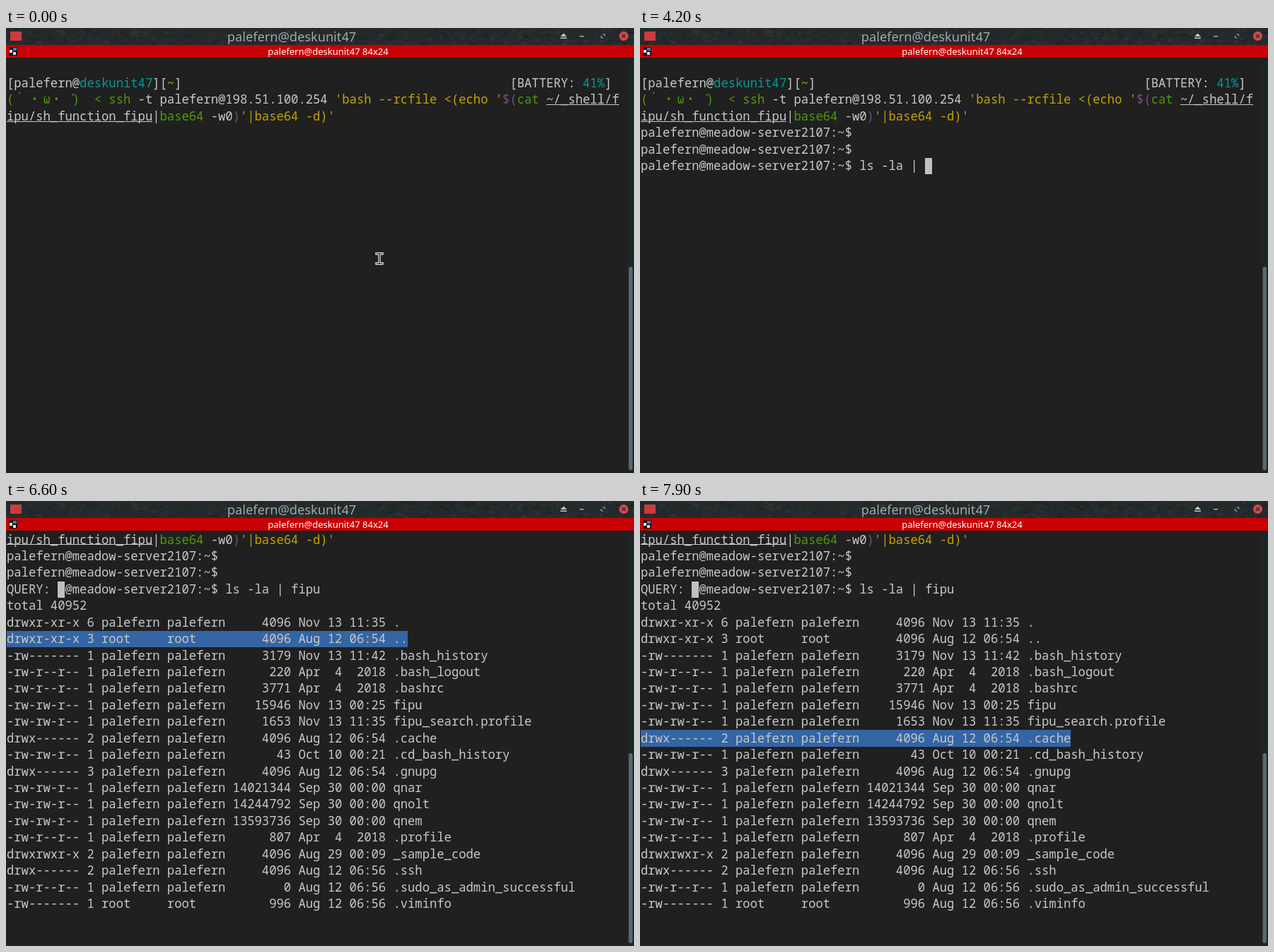
Write an HTML page with a canvas that moves like this. It is 888x630 px and loops after 8 s.

```html
<!DOCTYPE html>
<html lang="en">
<head>
<meta charset="utf-8">
<title>Terminal</title>
<style>
html, body { margin: 0; width: 100%; height: 100%; overflow: hidden; background: #202020; }
canvas { display: block; }
</style>
</head>
<body>
<canvas id="stage" width="888" height="630"></canvas>
<script>
const ctx = document.getElementById('stage').getContext('2d');
const LOOP = 8000;
const X0 = 1, Y0 = 43.3, CW = 10.31, RH = 23.43;
const MONO = '17.2px "Noto Sans Mono", "Noto Sans CJK JP", "Noto Sans CJK", "DejaVu Sans Mono", monospace';
const SANS = '"Noto Sans", "Open Sans", sans-serif';

const FG = '#c8c8c8', BG = '#202020', GREEN = '#4e9a06', YELLOW = '#c4a000',
      CYAN = '#06989a', PURPLE = '#75507b', BLUE = '#3465a4';

const USER = 'palefern', HOST = 'deskunit47', TOOL = 'fipu';
const TITLE = USER + '@' + HOST;
const PROMPT = USER + '@meadow-server2107:~$';
const COMMAND = 'ls -la | ' + TOOL;

// Each part: column, text, colour, underline
const HEAD = [
  [0, '[' + USER + '@', FG], [9 + 1, HOST, CYAN], [20, '][', FG], [22, '~', YELLOW], [23, ']', FG],
  [69, '[BATTERY:', FG], [79, '41%', CYAN], [82, ']', FG]
];
const SSH = [
  [0, '(', GREEN], [1, '｀', GREEN], [3, '・', GREEN], [5, 'ω', GREEN], [6, '・', GREEN],
  [8.5, '´', GREEN], [9, ')', GREEN], [12, '<', GREEN], [14, 'ssh', GREEN], [18, '-t', FG],
  [21, USER + '@198.51.100.254', FG], [45, "'bash --rcfile <(echo '", YELLOW],
  [68, '$(', PURPLE], [70, 'cat', GREEN], [74, '~/_shell/' + TOOL[0], FG, true]
];
const SSH_TAIL = [
  [0, TOOL.slice(1) + '/sh_function_' + TOOL, FG, true], [20, '|', FG], [21, 'base64', GREEN],
  [28, '-w0', FG], [31, ')', PURPLE], [32, "'|base64 -d)'", YELLOW]
];

const FILES = `drwxr-xr-x|6|u|4096|Nov 13 11:35|.
drwxr-xr-x|3|root|4096|Aug 12 06:54|..
-rw-------|1|u|3179|Nov 13 11:42|.bash_history
-rw-r--r--|1|u|220|Apr  4  2018|.bash_logout
-rw-r--r--|1|u|3771|Apr  4  2018|.bashrc
-rw-rw-r--|1|u|15946|Nov 13 00:25|${TOOL}
-rw-rw-r--|1|u|1653|Nov 13 11:35|${TOOL}_search.profile
drwx------|2|u|4096|Aug 12 06:54|.cache
-rw-rw-r--|1|u|43|Oct 10 00:21|.cd_bash_history
drwx------|3|u|4096|Aug 12 06:54|.gnupg
-rw-rw-r--|1|u|14021344|Sep 30 00:00|qnar
-rw-rw-r--|1|u|14244792|Sep 30 00:00|qnolt
-rw-rw-r--|1|u|13593736|Sep 30 00:00|qnem
-rw-r--r--|1|u|807|Apr  4  2018|.profile
drwxrwxr-x|2|u|4096|Aug 29 00:09|_sample_code
drwx------|2|u|4096|Aug 12 06:56|.ssh
-rw-r--r--|1|u|0|Aug 12 06:56|.sudo_as_admin_successful
-rw-------|1|root|996|Aug 12 06:56|.viminfo`;

const LISTING = ['total 40952'].concat(FILES.split('\n').map(line => {
  const [mode, links, owner, size, date, name] = line.split('|');
  const who = (owner === 'u' ? USER : owner).padEnd(8);
  return [mode, links, who, who, size.padStart(8), date, name].join(' ');
}));

// Time in ms and the value that holds from then on
const TYPED = [[0, 0], [3300, 1], [3400, 2], [3500, 3], [3600, 4], [3900, 7], [4100, 8],
  [4200, 9], [4700, 10], [4800, 11], [5000, 12], [5100, 13]];
const PROMPTS = [[0, 0], [2200, 1], [2900, 2], [3000, 3]];
const PICKED = [[0, 0], [6300, 1], [6600, 2], [6700, 3], [6800, 4], [6900, 5], [7100, 6],
  [7300, 7], [7500, 8], [7700, 9], [7900, 8]];

const valueAt = (table, t) => table.reduce((v, step) => t >= step[0] ? step[1] : v, 0);
const between = (t, a, b) => t >= a && t < b;

function box(x, y, w, h, color) {
  ctx.fillStyle = color;
  ctx.fillRect(x, y, w, h);
}

function write(row, col, text, color = FG, underline = false) {
  const top = Y0 + row * RH;
  ctx.font = MONO;
  ctx.textAlign = 'left';
  ctx.fillStyle = color;
  [...text].forEach((ch, i) => {
    if (ch !== ' ') ctx.fillText(ch, X0 + (col + i) * CW, top + 17.2);
  });
  if (underline) box(X0 + col * CW, Math.round(top + 18), text.length * CW, 1, color);
}

const writeParts = (row, parts) => parts.forEach(part => write(row, ...part));

function cells(row, col, count, color) {
  const x = Math.round(X0 + col * CW), y = Math.round(Y0 + row * RH);
  box(x, y, Math.round(X0 + (col + count) * CW) - x, Math.round(Y0 + (row + 1) * RH) - y, color);
}

const cursor = (row, col) => cells(row, col, 1, '#c0c0c0');

function label(text, x, y, size, color) {
  ctx.font = size + 'px ' + SANS;
  ctx.textAlign = 'center';
  ctx.fillStyle = color;
  ctx.fillText(text, x, y);
}

function line(points, color, width) {
  ctx.beginPath();
  points.forEach(([x, y], i) => i % 2 ? ctx.lineTo(x, y) : ctx.moveTo(x, y));
  ctx.strokeStyle = color;
  ctx.lineWidth = width;
  ctx.stroke();
}

function texture() {
  let seed = 7;
  const rnd = () => (seed = seed * 16807 % 2147483647) / 2147483647;
  for (let i = 0; i < 420; i++) {
    const tint = ['70,90,90', '10,14,16', '90,65,55'][i % 3];
    box(rnd() * 888, rnd() * 24, 2 + rnd() * 6, 1 + rnd() * 4, `rgba(${tint},0.16)`);
  }
}

function frame(scrolled) {
  box(0, 0, 888, 24, '#242a2c');
  texture();
  box(6, 5, 16, 13, '#c83c40');
  label(TITLE, 404, 19, 18.2, '#a3a8a9');

  ctx.fillStyle = '#c3c7c8';
  ctx.beginPath();
  ctx.moveTo(784, 12);
  ctx.lineTo(788.5, 7.5);
  ctx.lineTo(793, 12);
  ctx.fill();
  box(784, 13.5, 9, 1.5, '#c3c7c8');
  box(811, 11, 6, 1.5, '#a3a8a9');
  line([[843.5, 9], [846.5, 9], [846.5, 8.5], [846.5, 11.5],
        [841.5, 11], [841.5, 14], [841.5, 14], [844.5, 14]], '#a3a8a9', 1.2);
  ctx.fillStyle = '#d6484c';
  ctx.beginPath();
  ctx.arc(873.5, 11.5, 6.5, 0, 7);
  ctx.fill();
  line([[871, 9], [876, 14], [876, 9], [871, 14]], '#33292b', 1.4);

  box(0, 24, 888, 18, '#c80003');
  box(4, 27, 12, 12, '#1b1215');
  box(5, 31, 4, 4, '#e4e4e4');
  box(10, 28, 5, 4, '#3f7fb8');
  box(10, 34, 4, 4, '#e4e4e4');
  label(TITLE + ' 84x24', 455.5, 38, 13, '#ffffff');

  box(878, 42, 10, 588, '#1b2527');
  box(0, 628, 888, 2, '#1b2527');
  const top = scrolled ? 357 : 338;
  ctx.fillStyle = '#59696d';
  ctx.beginPath();
  ctx.roundRect(880.5, top, 5.5, 626 - top, 2.7);
  ctx.fill();
}

function pointer() {
  const beam = [[524, 319.5], [532, 319.5], [528, 319.5], [528, 333.5], [524, 333.5], [532, 333.5]];
  ctx.lineCap = 'square';
  line(beam, '#f0f0f0', 3.4);
  line(beam, '#151515', 1.2);
  ctx.lineCap = 'butt';
}

function shell(t) {
  writeParts(1, HEAD);
  writeParts(2, SSH);
  writeParts(3, SSH_TAIL);
  const prompts = valueAt(PROMPTS, t), typed = valueAt(TYPED, t);
  for (let i = 0; i < prompts; i++) write(4 + i, 0, PROMPT);
  write(6, 30, COMMAND.slice(0, typed));

  if (between(t, 300, 1000)) cursor(3, 45);
  else if (between(t, 1000, 1900)) cursor(4, 0);
  else if (between(t, 2500, 5300)) cursor(3 + prompts, 30 + typed);
  else if (t >= 5300) cursor(7, 0);
  if (t < 1000) pointer();
}

function picker(t) {
  writeParts(0, SSH_TAIL);
  write(1, 0, PROMPT);
  write(2, 0, PROMPT);
  write(3, 0, 'QUERY:  ' + PROMPT.slice(8) + ' ' + COMMAND);
  const picked = valueAt(PICKED, t);
  LISTING.forEach((text, i) => {
    if (i === picked) cells(4 + i, 0, text.length, BLUE);
    write(4 + i, 0, text);
  });
  if (!between(t, 5800, 6300)) cursor(3, 7);
}

function draw(t) {
  const listed = t >= 5400;
  box(0, 0, 888, 630, BG);
  frame(listed);
  (listed ? picker : shell)(t);
}

const start = performance.now();
function tick() {
  draw((performance.now() - start) % LOOP);
  requestAnimationFrame(tick);
}
tick();
</script>
</body>
</html>
```
